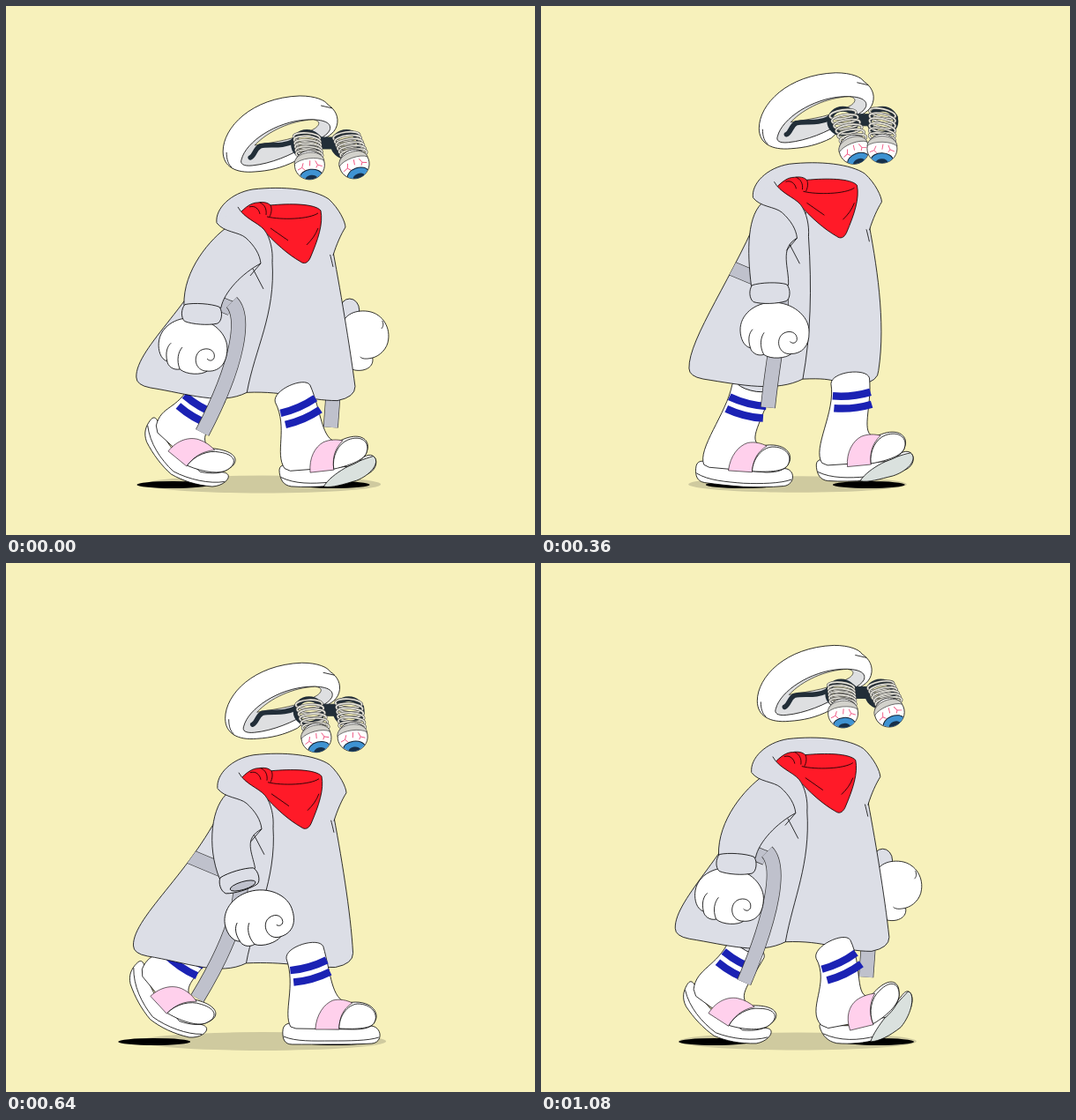
Animation of 600 by 600 pixels, one loop 1.12 s. Source, as an HTML page:

```html
<!DOCTYPE html>
<html lang="en">
<head>
<meta charset="utf-8">
<title>Walk cycle</title>
<style>
html, body { margin: 0; width: 100%; height: 100%; overflow: hidden; background: #f7f1bb; }
svg { display: block; width: 100vw; height: 100vh; }
</style>
</head>
<body>
<svg id="stage" viewBox="0 0 600 600" stroke-linejoin="round"></svg>
<script>
const LOOP = 1120, HALF = LOOP / 2, STEP = 40, FLOOR = 546;
const SKY = '#f7f1bb', COAT = '#dcdee6', BELT = '#bfc1cc', RED = '#ff1a28',
      BLUE = '#1b22b4', PINK = '#ffd0ec', DARK = '#222e38', SOLE = '#dae1de';

// Cosine around a mean with its maximum at time `peak`: once per step, or once per stride.
const wave = (t, period, mean, amp, peak) => mean + amp * Math.cos(2 * Math.PI * (t - peak) / period);
const step = (t, ...shape) => wave(t, HALF, ...shape);
const stride = (t, ...shape) => wave(t, LOOP, ...shape);

const clamp = (v, lo = 0, hi = 1) => Math.min(hi, Math.max(lo, v));
const ramp = (t, from, to) => {
  const u = clamp((t - from) / (to - from));
  return u * u * (3 - 2 * u);
};
const mod = t => (t % LOOP + LOOP) % LOOP;
const rad = a => a * Math.PI / 180;
const deg = a => a * 180 / Math.PI;

// Maps local points to the stage; `bend` curls both ends upwards.
function frameAt(x, y, angle, bend = 0) {
  const c = Math.cos(rad(angle)), s = Math.sin(rad(angle));
  return (u, v) => {
    const w = v - bend * u * u;
    return `${(x + u * c - w * s).toFixed(2)},${(y + u * s + w * c).toFixed(2)}`;
  };
}
// Applies such a mapping to every "x,y" pair of a path.
const mapPath = (f, d) => d.replace(/(-?[\d.]+),(-?[\d.]+)/g, (_, u, v) => f(+u, +v));

const path = (d, fill = 'none', stroke = '#000', width = .8, extra = '') =>
  `<path d="${d}" fill="${fill}" stroke="${stroke}" stroke-width="${width}" ${extra}/>`;
const oval = (x, y, rx, ry, fill, stroke = 'none', width = .8) =>
  `<ellipse cx="${x}" cy="${y}" rx="${rx}" ry="${ry}" fill="${fill}" stroke="${stroke}" stroke-width="${width}"/>`;
const group = (x, y, angle, body) =>
  `<g transform="translate(${x} ${y}) rotate(${angle})">${body}</g>`;
const ribbon = (d, width) => path(d, 'none', '#333', width) + path(d, 'none', BELT, width - 1.4);

// Planted foot slides back evenly; the swing joins both ends at the same speed.
function footX(p) {
  const heel = 366, speed = -.377, lift = 510;
  if (p < lift) return heel + speed * p;
  const span = LOOP - lift, u = (p - lift) / span, toe = heel + speed * lift;
  return toe + (heel - toe) * ramp(u, 0, 1) + speed * span * u * (1 - u) * (1 - 2 * u);
}

function legPose(t, offset) {
  const p = mod(t), q = mod(t - 60);
  const x = footX(p);
  const angle = 44 * ramp(q, 240, 600) - 82 * ramp(q, 690, 980) + 38 * ramp(q, 950, 1110);
  const lift = 12 * Math.sin(Math.PI * clamp((p - 560) / 440));
  // Lowest point of the curled sole rests on the floor.
  const bend = .007 * Math.min(1, Math.abs(angle) / 20) + 1e-6;
  const slope = Math.tan(rad(angle)), low = clamp(slope / (2 * bend), -50, 50);
  const drop = (slope * low - bend * low * low) * Math.cos(rad(angle));
  const sockX = 264 + .62 * (x - 270) + 2 * lift;
  return {
    x: x - .24 * angle + offset, y: FLOOR - drop - lift, angle, bend,
    sockX: sockX + offset, sockY: 436 + .2 * step(t, -9.5, 19.5, 95) - 1.4 * lift,
    tilt: .85 * deg(Math.atan2(sockX - x + 10, 62)),
    shadowX: 272 + 1.06 * (x - 272) + offset
  };
}

function leg({ x, y, angle, bend, sockX, sockY, tilt }) {
  const up = clamp(-angle / 35), open = clamp(tilt / 8);
  const sole = frameAt(x, y, angle, bend), sock = frameAt(sockX, sockY, tilt);
  const foot = (u, v) => sole(u - 10 * up, v);
  const stripe = v => path(mapPath(sock, `M-21.5,${v}Q0,${v + 4} 21.5,${v}`), 'none', BLUE, 8.5);
  const s = d => mapPath(sole, d), f = d => mapPath(foot, d), k = d => mapPath(sock, d);
  return path(s('M-55,-14C-55,-24 -48,-25 -40,-23C-25,-22 -12,-21 0,-21C18,-21 32,-21 45,-21C58,-20 59,-2 46,-1C30,0 15,0 0,0C-15,0 -30,0 -44,0C-53,0 -55,-6 -55,-14Z'), '#fff')
    + path(s('M-54,-9C-40,-3 -20,-4 0,-4C20,-4 42,-4 54,-8'))
    + (up > .1 ? path(s(`M-8,0C4,-14 32,-20 53,-17C60,-8 50,${7 * up} 30,${6 * up}C14,${5 * up} 2,3 -8,0Z`), SOLE) : '')
    + path(f('M-46,-20C-55,-36 ') + k('-20,38 -22,5C-20,-9 20,-9 22,3C22,36 ')
      + f('0,-52 18,-47C45,-52 55,-36 50,-27C47,-19 38,-17 25,-17L-40,-18Z'), '#fff')
    + stripe(19) + stripe(33)
    + group(sockX, sockY, tilt, oval(0, 1, 17, 5 * open, COAT, open ? '#000' : 'none'))
    + path(f('M-18,-17C-17,-34 -8,-46 2,-50C10,-52 18,-50 24,-47C13,-40 9,-30 9,-17Z'), PINK, '#000', .6)
    + path(f('M9,-18C9,-32 18,-45 30,-46C46,-46 54,-34 49,-25C46,-18 30,-17 9,-18Z'), '#fff');
}

function hand(x, y, angle) {
  return group(x, y, angle,
    path('M-39 0C-39-18-22-31-2-31C20-31 40-15 39 4C39 20 30 28 18 28C12 33-5 34-13 28C-21 30-27 25-28 20C-36 18-39 8-39 0Z', '#fff')
    + path('M-28 20C-31 10-29 3-25-1M-13 28C-18 18-16 8-12 3M18 28C4 29 0 12 9 5C17 0 26 4 25 12C24 16 20 17 17 14'));
}

function eye(lensX, lensY, x, y, id) {
  const dx = x - lensX, dy = y - lensY, tilt = -deg(Math.atan2(dx, dy));
  const ring = oval(0, 0, 15, 5, 'none', '#444', 2.8) + oval(0, 0, 15, 5, 'none', '#e5e3da', 1.7);
  let coils = '';
  for (let i = 0; i < 6; i++) {
    const k = i / 5;
    coils += group(lensX + dx * k * .9, lensY - 6 + (dy - 6) * k, tilt + 12, ring);
  }
  const ball = oval(0, 0, 17, 16.5, '#fff', '#222')
    + path('M-17-3C-16-18 16-18 17-3C10-9-10-9-17-3Z', '#d2d1cb', '#444', .7)
    + path('M-14 4L-9 2L-7-3M-9 2L-6 5M14 3L9 1L7-4M9 1L7 4M0 1L1-5', 'none', '#f0527f', .9)
    + `<clipPath id="${id}"><circle r="16.4"/></clipPath><g clip-path="url(#${id})">`
    + oval(0, 13, 12.5, 8, '#3f93d2', '#123', 1) + oval(0, 16, 7, 4.5, '#17304a') + '</g>';
  return coils + group(x, y, tilt, ball);
}

function head(t) {
  const drop = step(t, 188, 9, 230);
  const rim = x => oval(x, 157, 15, 14, SKY, DARK, 6);
  return path('M246 165C246 138 278 104 333 102C351 102 362 107 365 112C373 117 378 126 375 136C372 146 362 150 352 154L328 176C312 184 298 187 282 188C260 190 246 182 246 165Z', '#fff')
    + path('M267 174C272 154 306 131 341 129C361 128 370 133 367 141C363 149 348 154 339 159C324 169 300 179 279 181C269 182 265 179 267 174Z', '#dedfe1')
    + path('M282 158C297 142 323 130 348 129C357 130 356 135 350 139C331 151 307 154 282 158Z', SKY, '#000', .6)
    + path('M357 113L370 116M250 166C250 174 252 180 256 183')
    + path('M277 172C282 170 282 162 288 159C300 156 311 161 327 153', 'none', DARK, 5.5, 'stroke-linecap="round"')
    + path('M322 154C330 141 349 140 358 149L373 149C381 140 399 142 403 152L400 162L328 162Z', DARK, DARK, 1)
    + rim(341) + rim(386)
    + eye(341, 155, stride(t, 348, 6, 400), drop, 'ballA')
    + eye(386, 154, stride(t, 391.5, -6, 390), drop - 1, 'ballB');
}

// Flap's front corner is shared by both halves of the coat.
const flapCorner = t => [step(t, 283.5, 12.5, 335), step(t, 448, 10, 255)];
// Sharp pulse while the near arm is in front.
const armForward = t => stride(t, .5, .5, 570) ** 4;

function coatBack(t) {
  const [fx, fy] = flapCorner(t);
  const rx = step(t, 387, 9, 0), ry = step(t, 437.5, 6, 300);
  const beltX = step(t, 357, 12, 530), beltY = 478 - 70 * armForward(t);
  return group(stride(t, 368, 40, 20), stride(t, 386, -11, 20), 0,
      oval(-18, -30, 11, 13, COAT, '#000')
      + path('M-28-5C-28-22-16-30 0-29C18-28 28-12 26 3C25 14 16 22 8 24C10 34 0 40-12 38C-24 36-28 15-28-5Z', '#fff')
      + path('M8 24C0 26-4 25-6 23M19-18C21-14 20-11 18-9'))
    + ribbon(`M${beltX + 4} ${beltY - 55}L${beltX} ${beltY}`, 17)
    + path(`M300 255L369 268C379 320 390 386 ${rx} ${ry}Q${rx} ${ry + 12} ${rx - 20} ${ry + 16}`
      + `C${rx - 55} ${ry + 16} ${fx + 45} ${fy - 2} ${fx} ${fy}L${fx - 20} ${fy - 20}Z`, COAT)
    + path('M362 262C366 275 369 287 371 296');
}

function coatFront(t) {
  const [fx, fy] = flapCorner(t);
  const lx = step(t, 155, 11.5, 360), ly = step(t, 432, 11, 290);
  const cuffX = stride(t, 245, 23, 530), cuffY = step(t, 352, -3, 0), tilt = 4 - 24 * armForward(t);
  const open = clamp(stride(t, 0, 1, 720)) ** 2;
  const handX = stride(t, 250, 38, 575), handY = step(t, 392, -4, 0) - stride(t, 0, 3, 0);
  const beltX = step(t, 261, -5, 0), beltEnd = step(t, 236, 20, 355);
  const cuff = frameAt(cuffX, cuffY, tilt);
  const flap = `M252 250C218 335 ${lx - 1} ${ly - 34} ${lx} ${ly}Q${lx} ${ly + 9} ${lx + 16} ${ly + 12}`
    + `C${lx + 60} ${ly + 19} ${fx - 30} ${fy + 15} ${fx} ${fy}C${fx + 9} ${fy - 50} 306 350 302 290L290 250Z`;
  return path(flap, COAT)
    + `<clipPath id="flap"><path d="${flap}"/></clipPath><g clip-path="url(#flap)">${ribbon('M200 320L255 343', 17)}</g>`
    + path('M239 246C237 230 255 212 280 208C315 204 350 208 366 219C378 230 385 245 385 251C380 259 375 270 371 283', COAT)
    + path('M264 236C272 228 278 223 286 223C292 222 297 223 300 226C322 224 350 224 357 232C360 247 354 265 345 286C342 292 338 293 334 290C320 282 306 270 288 250Z', RED)
    + path('M296 239C312 243 344 242 354 235M276 228C282 226 287 230 288 236M288 223C293 225 296 230 295 237M300 226C302 230 301 235 299 239M300 252L320 266M354 252C351 260 347 265 341 271')
    + path('M280 298L292 321')
    + ribbon(`M${beltX} 336C${beltX + 16} 352 264 405 ${beltEnd} 484`, 17)
    + hand(handX, handY, tilt)
    + path('M252 250C232 264 ' + mapPath(cuff, '-25,-48 -21,-8L21,-8C23,-26 ') + ' 268 303 289 292', COAT)
    + group(cuffX, cuffY, tilt,
      path('M-20-9C-10-12 10-12 19-9C24-4 23 8 18 10C8 13-10 13-19 10C-24 6-24-4-20-9Z', COAT)
      + oval(2, 7, 15, 5.5 * open, BELT, open > .05 ? '#000' : 'none'))
    + path('M239 246C247 257 264 256 272 263C282 272 288 282 289 292L302 290C304 278 300 262 293 254C285 245 271 242 263 228Z', COAT, 'none')
    + path('M239 246C247 257 264 256 272 263C282 272 288 282 289 292L277 306M263 228C270 241 285 245 293 254C300 263 303 278 302 290');
}

function draw(t) {
  const near = legPose(t, 0), far = legPose(t + HALF, 33);
  const bodyX = step(t, 1.2, 1.4, 235), bodyY = step(t, -9.5, 19.5, 95);
  const spread = 85 + .27 * Math.abs(near.shadowX - far.shadowX);
  const shadow = ({ shadowX }) => oval(shadowX, 543, 41, 4, '#000');
  return `<rect width="600" height="600" fill="${SKY}"/>`
    + oval(291, 542.5, spread, spread / 13.5, '#cfca9f')
    + shadow(far) + shadow(near)
    + group(bodyX, bodyY, 0, coatBack(t))
    + leg(far) + leg(near)
    + group(bodyX, bodyY, 0, coatFront(t))
    + group(step(t, 2, 3, 200), step(t, -7.5, 19.5, 105), 0, head(t));
}

const stage = document.getElementById('stage');
let start, shown = -1;
function tick(now) {
  start ??= now;
  const t = Math.floor((now - start) % LOOP / STEP) * STEP;
  if (t !== shown) stage.innerHTML = draw(shown = t);
  requestAnimationFrame(tick);
}
stage.innerHTML = draw(0);
requestAnimationFrame(tick);
</script>
</body>
</html>
```
